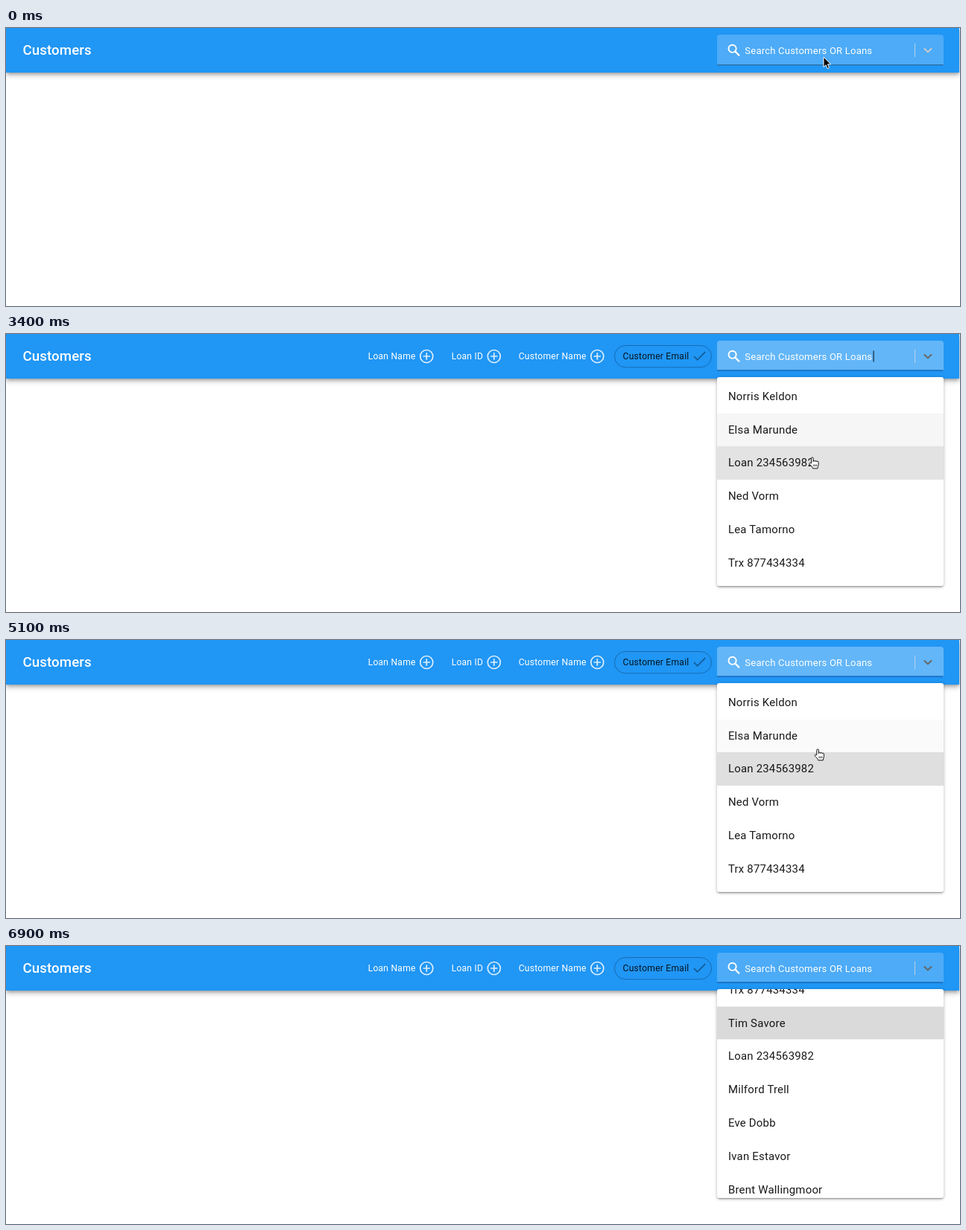
Animation of 1280 by 374 pixels, one loop 7 s. Source, as an HTML page:

```html
<!DOCTYPE html>
<html lang="en">
<head>
<meta charset="utf-8">
<title>Customer search</title>
<style>
  html, body { margin: 0; width: 100%; height: 100%; overflow: hidden; background: #fff; }
  body { position: relative; font-family: Roboto, sans-serif; }
  header, #field, #menu, #thumb, svg { position: absolute; }
  header {
    left: 0; top: 0; width: 1279px; height: 60px; background: #2096f5;
    box-shadow: 0 2px 4px -1px rgba(0,0,0,.24), 0 4px 6px rgba(0,0,0,.17), 0 1px 10px rgba(0,0,0,.13);
  }
  svg { left: 0; top: 0; width: 1280px; height: 374px; }
  #field { left: 954px; top: 9.3px; width: 303.5px; height: 40.7px; border-radius: 4px 4px 0 0; }
  #menu {
    left: 954px; top: 58px; width: 303.5px; height: 280.6px; overflow: hidden;
    background: #fff; border-radius: 3px;
    box-shadow: 0 1px 5px rgba(0,0,0,.22), 0 2px 2px rgba(0,0,0,.16), 0 3px 1px -2px rgba(0,0,0,.14);
  }
  #list { padding-top: 3.8px; }
  #list div {
    height: 44.8px; line-height: 44.8px; padding-left: 14.93px; white-space: nowrap;
    font-size: 14.93px; letter-spacing: .22px; color: rgba(0,0,0,.9);
  }
  #thumb { right: 1.5px; top: 2px; width: 7px; height: 52px; border-radius: 3.5px; background: #7d7d7d; }
  .title { font-size: 18.67px; font-weight: 500; letter-spacing: .0075em; }
  .hint { font-size: 13.07px; letter-spacing: .2px; }
  .chip { font-size: 12.13px; letter-spacing: .22px; }
</style>
</head>
<body>
<header></header>
<div id="field"></div>
<svg viewBox="0 0 1280 374" fill="#fff">
  <text class="title" x="22.4" y="36.3">Customers</text>
  <g id="chips" class="chip">
    <g id="adders"></g>
    <rect x="816.5" y="15.5" width="130" height="29.3" rx="14.6" fill="none" stroke="#000" stroke-opacity=".28"/>
    <text x="827.6" y="34.4" fill="#000" fill-opacity=".87">Customer Email</text>
    <path transform="translate(919.3 18.3) scale(.933)" fill="#000" fill-opacity=".38"
      d="M9 16.17 4.83 12l-1.42 1.41L9 19 21 7l-1.41-1.41z"/>
  </g>
  <g fill="none" stroke="#fff" stroke-width="1.9">
    <circle cx="974.6" cy="27.8" r="5.1"/><path stroke-width="2.3" d="M978.4 31.6 984 37.2"/>
  </g>
  <text class="hint" x="991.3" y="34.6">Search Customers OR Loans</text>
  <rect id="caret" x="1163.5" y="22.5" width="1.2" height="15" fill="#12283c"/>
  <rect x="1219" y="20.7" width="1" height="18.4" fill="#b4d1ec"/>
  <path id="chevron" d="M1232.4 28 1236.9 32.4 1241.4 28" fill="none" stroke-width="2" stroke-linecap="round" stroke-linejoin="round"/>
  <rect id="base" x="954" y="49.2" width="303.5" height="1" fill="#000" fill-opacity=".45"/>
  <rect id="line" y="48.2" height="1.9" fill="#1a73c4"/>
</svg>
<div id="menu"><div id="list"></div><div id="thumb"></div></div>
<svg viewBox="0 0 1280 374">
  <defs>
    <path id="stem" d="M-3.3-7Q-.3-7 0-5.4 .3-7 3.3-7M0-5.4V5.4M-3.3 7Q-.3 7 0 5.4 .3 7 3.3 7M-1.8 2H1.8"/>
  </defs>
  <path id="arrow" d="M0 0V13.6L3.1 10.7 5.2 15.6 7.5 14.6 5.4 9.8H9.7Z" stroke="#fff"/>
  <g id="beam" fill="none">
    <use href="#stem" stroke="#fff" stroke-width="2.6" stroke-opacity=".75"/>
    <use href="#stem" stroke="#111" stroke-width="1.1"/>
  </g>
  <g id="hand">
    <g transform="translate(-5 -.8)" stroke="#111" stroke-linejoin="round">
      <path fill="#fff" d="M3.6 8.6V2A1.3 1.3 0 0 1 6.2 2V6.4A1.2 1.2 0 0 1 8.6 6.3 1.2 1.2 0 0 1 11 6.8 1.1 1.1 0 0 1 13.2 7.4V10.5C13.2 12.5 12 13.5 12 15.6H5.6C5.2 13.5 2.6 11.6 1.2 9.7 .3 8.4 1.8 7.2 3.6 8.6Z"/>
      <path stroke-width=".8" d="M6.8 10.2V13M8.7 10.2V13M10.6 10.2V13"/>
    </g>
  </g>
</svg>
<script>
const LOOP = 7000, STEP = 100, CLICK = 1365, FADE = 150;
const SCROLL_START = 5260, SCROLL_END = 6200, LEAVE = 6300;
const MENU_TOP = 58, FIRST_ROW = 61.8, ROW = 44.8;

const $ = id => document.getElementById(id);
const ramp = (t, start, length) => Math.max(0, Math.min(1, (t - start) / length));
const easeOut = (p, k = 2) => 1 - (1 - p) ** k;
const smooth = p => p * p * (3 - 2 * p);
const show = (id, on) => $(id).style.visibility = on ? "visible" : "hidden";

const items = ["Norris Keldon", "Elsa Marunde", "Loan 234563982", "Ned Vorm", "Lea Tamorno",
  "Trx 877434334", "Tim Savore", "Loan 234563982", "Milford Trell", "Eve Dobb",
  "Ivan Estavor", "Brent Wallingmoor"];
$("list").innerHTML = items.map(name => `<div>${name}</div>`).join("");
const rows = [...$("list").children];

const adder = (label, x) =>
  `<text x="${x - 14.6}" y="34.4" text-anchor="end">${label}</text>
   <g fill="none" stroke="#fff" stroke-opacity=".85" stroke-width="1.7">
     <circle cx="${x}" cy="30" r="8.5"/><path d="M${x - 4.7} 30h9.4M${x} 25.3v9.4"/></g>`;
$("adders").innerHTML = adder("Loan Name", 564.3) + adder("Loan ID", 654.8) + adder("Customer Name", 793.3);

// The pointer glides between its resting places: start, end, x, y.
const moves = [
  [0, 200, 1101, 34], [900, 1000, 1101, 30], [2200, 3000, 1087, 134], [3100, 3500, 1081, 172],
  [3600, 4400, 1079, 274], [4600, SCROLL_START, 1091, 125], [LEAVE, 6800, 1104, -25]
];
function pointer(t) {
  let x = 1097, y = 39;
  for (const [start, end, toX, toY] of moves) {
    const p = smooth(ramp(t, start, end - start));
    x += (toX - x) * p;
    y += (toY - y) * p;
  }
  return [x, y];
}

const scrollAt = t => 249.5 * easeOut(ramp(t, SCROLL_START - 10, SCROLL_END - SCROLL_START), 1.44);

// Rows react to pointer movement only, not to scrolling beneath it.
function rowAt(t) {
  if (t > SCROLL_START && t < LEAVE) t = SCROLL_START;
  t = Math.min(t, LEAVE + FADE);
  return Math.max(0, Math.floor((pointer(t)[1] - FIRST_ROW + scrollAt(t)) / ROW));
}

function drawPointer(t) {
  const [x, y] = pointer(t);
  const kind = t < 100 ? "arrow" : y < MENU_TOP ? "beam" : "hand";
  for (const id of ["arrow", "beam", "hand"]) show(id, id === kind);
  $(kind).setAttribute("transform", `translate(${x} ${y})`);
}

function drawField(t, open) {
  const lit = easeOut(ramp(t, 1250, FADE)) - easeOut(ramp(t, 6700, FADE));
  $("field").style.background = `rgba(255,255,255,${.2 + .1 * lit})`;
  const grey = 204 - 102 * easeOut(ramp(t, CLICK, FADE));
  $("chevron").setAttribute("stroke", `rgb(${grey},${grey},${grey})`);
  const width = 303.5 * easeOut(ramp(t, CLICK, 200), 3);
  $("line").setAttribute("x", 1105.75 - width / 2);
  $("line").setAttribute("width", width);
  show("base", t < 1300);
  show("caret", open && (t - CLICK) % 1000 < 500);
}

function drawMenu(t, open) {
  show("chips", open);
  show("menu", open);
  const scroll = scrollAt(t);
  $("list").style.transform = `translateY(${-scroll}px)`;
  $("thumb").style.transform = `translateY(${scroll * .2}px)`;
  $("thumb").style.opacity = t < SCROLL_START ? 0 : 1 - ramp(t, 6600, 250);

  // A row's shade is its share of the last FADE milliseconds under the pointer.
  const shade = rows.map(() => 0);
  for (let age = 0; age < FADE; age += 5) shade[rowAt(t - age)] += 5 / FADE;
  rows.forEach((row, i) => row.style.background = `rgba(0,0,0,${.145 * shade[i]})`);
}

function frame() {
  const t = Math.floor((performance.now() + 20) / STEP) * STEP % LOOP;
  const open = t >= CLICK;
  drawPointer(t);
  drawField(t, open);
  drawMenu(t, open);
  requestAnimationFrame(frame);
}
frame();
</script>
</body>
</html>
```
